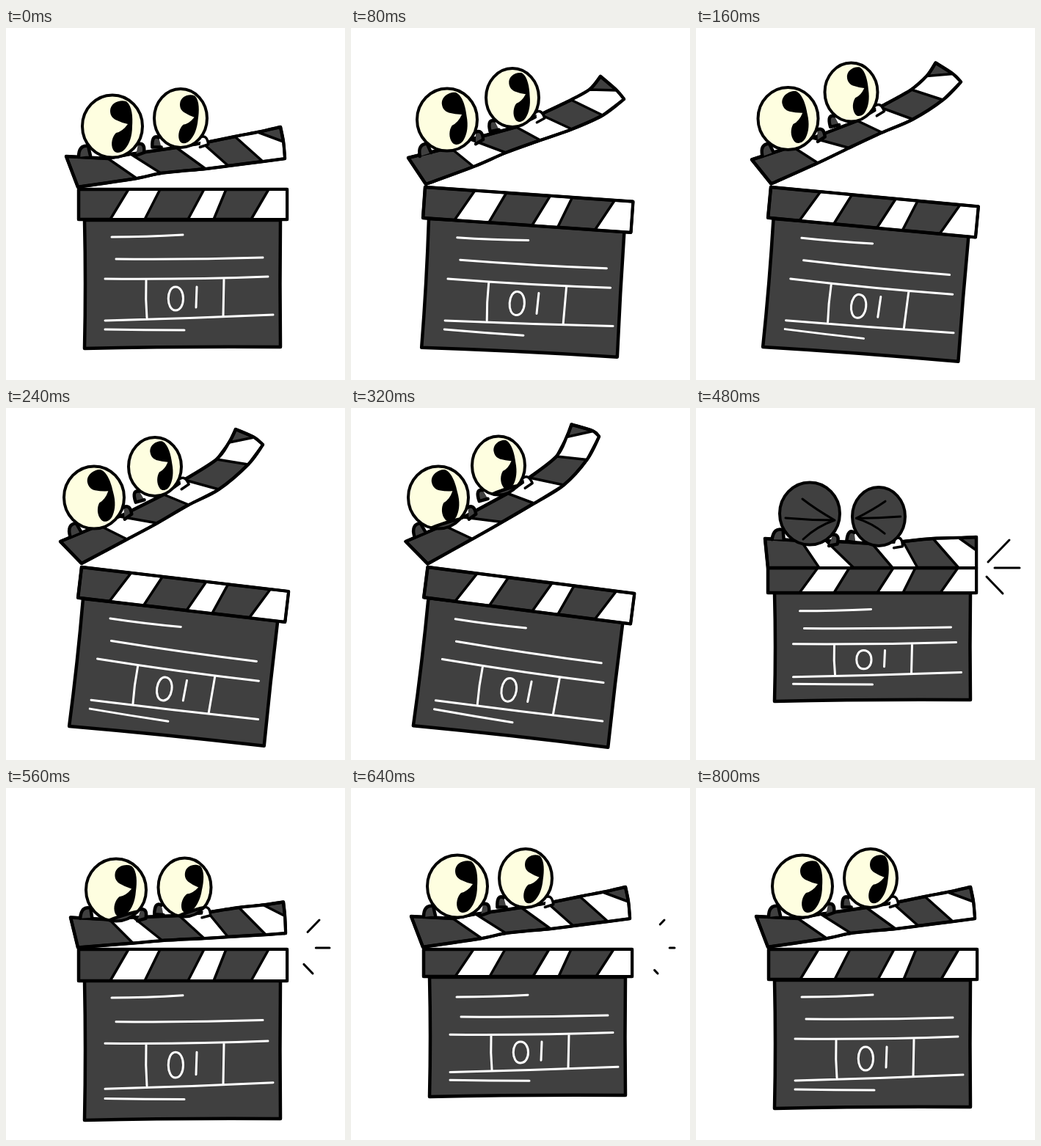
Recreate the animation shown at these times as an HTML page. Size 462 by 480 pixels, loop 1130 ms.

```html
<!DOCTYPE html>
<html lang="en">
<head>
<meta charset="utf-8">
<title>Clapperboard</title>
<style>
  html, body { margin: 0; width: 100%; height: 100%; overflow: hidden; background: #fff; }
  svg { display: block; width: 462px; height: 480px; }
  svg * { vector-effect: non-scaling-stroke; stroke-linecap: round; stroke-linejoin: round; }
  .dark { fill: #404040; stroke: #000; stroke-width: 4.5; }
  .white { fill: #fff; stroke: #000; stroke-width: 3.5; }
  .ink { fill: none; stroke: #fff; stroke-width: 3; }
  .line { fill: none; stroke: #000; stroke-width: 3; }
  .rim { fill: none; stroke: #000; stroke-width: 4; }
</style>
</head>
<body>
<svg id="stage" viewBox="0 0 462 480"></svg>
<script>
const FRAME = 80, LOOP = 1130;

// arm: left, hinge, lower edge, tip, then back along the upper edge
// eyes: x, y, x, y, tilt; strip and panel: x, y, angle, height
// ink: angle, pivot x, pivot y, dx, dy, vertical scale
const rest = {
  arm: [82,175, 98,217, 178,205, 211,198, 272,192, 303,188, 350,182, 380,178,
        378,155, 374,135, 343,142, 312,148, 268,157, 232,163, 170,172, 139,178],
  eyes: [145, 134, 238, 123, 0],
  strip: [99, 220, 0, 41],
  panel: [107, 262, 0, 174],
  ink: [0, 140, 284, 0, 0, 1],
  lid: 0, shut: 0, spark: 1
};
const lift = { ...rest,
  arm: [78,177, 102,213, 167,189, 211,170, 258,153, 301,138, 343,119, 372,97,
        362,85, 340,66, 325,84, 300,98, 258,118, 225,135, 163,152, 135,163],
  eyes: [131, 125, 220, 95, -11],
  strip: [101, 217, 4, 42],
  panel: [106, 260, 3.2, 175],
  ink: [3.9, 140, 297, 0, 0.5, 1]
};
const high = { ...rest,
  arm: [74,182, 103,212, 165,179, 206,157, 249,132, 290,111, 330,77, 350,50,
        338,40, 313,29, 304,47, 287,70, 243,98, 215,118, 155,148, 127,160],
  eyes: [120, 122, 203, 80, -16],
  strip: [103, 217, 6.7, 42],
  panel: [105, 260, 6.2, 174],
  ink: [8.6, 137, 272, 0, 1, 1]
};
const peak = { ...rest,
  arm: [75,182, 106,213, 166,178, 206,154, 250,128, 290,99, 313,64, 326,28,
        322,23, 288,16, 284,32, 273,62, 243,92, 212,115, 152,150, 125,160],
  eyes: [118, 122, 199, 77, -16],
  strip: [106, 217, 7.9, 41],
  panel: [106, 258, 7.3, 175],
  ink: [9.5, 128, 277, 0, 1, 1],
  lid: 1
};
const clap = { ...rest,
  arm: [94,178, 98,218, 168,218, 215,218, 268,218, 302,218, 358,218, 382,218,
        382,194, 382,176, 358,177, 323,178, 282,182, 240,185, 177,181, 143,181],
  eyes: [155, 144, 249, 148, 8],
  strip: [98, 218, 0, 34],
  panel: [107, 252, 0, 147],
  ink: [0, 140, 284, -2.5, -8, 0.79],
  shut: 1, spark: 0
};
const squash = { ...rest,
  strip: [99, 220, 0, 37],
  panel: [107, 258, 0, 162],
  ink: [0, 140, 284, 0, 0, 0.9],
  spark: 0.8
};

const lerp = (a, b, t) => a + (b - a) * t;
function mix(a, b, t) {
  if (typeof a === 'number') return lerp(a, b, t);
  if (Array.isArray(a)) return a.map((v, i) => mix(v, b[i], t));
  return Object.fromEntries(Object.keys(a).map(k => [k, mix(a[k], b[k], t)]));
}

const stretch = { ...mix(clap, rest, 0.5),
  strip: [99, 220, 0, 43], panel: [107, 262, 0, 190], ink: [0, 140, 284, 0, 1, 1.09],
  lid: 0.5, shut: 0, spark: 0.45
};
const settle = { ...rest, panel: [107, 262, 0, 178], ink: [0, 140, 284, 0, 0, 1.02] };

const poses = [rest, lift, mix(lift, high, 0.5), high, mix(high, peak, 0.5), peak,
               clap, stretch, squash, settle, rest];

const path = (cls, d) => `<path class="${cls}" d="${d}"/>`;
const poly = pts => 'M' + pts.map(p => p.join()).join('L') + 'Z';
const group = (transform, body) => `<g transform="${transform}">${body}</g>`;

// Smooth cubic segments through the points, continuing from the first one
function curve(pts) {
  let d = '';
  for (let i = 0; i < pts.length - 1; i++) {
    const a = pts[i], b = pts[i + 1], p = pts[i - 1] || a, n = pts[i + 2] || b;
    const c1 = [0, 1].map(k => a[k] + (b[k] - p[k]) / 6);
    const c2 = [0, 1].map(k => b[k] - (n[k] - a[k]) / 6);
    d += `C${c1} ${c2} ${b}`;
  }
  return d;
}

function drawPanel([x, y, angle, h]) {
  return group(`translate(${x} ${y}) rotate(${angle})`,
    path('dark', `M0,0H267Q266,${h / 2} 267,${h - 1}Q130,${h - 2} 0,${h + 1}Q2,${h / 2} 0,0Z`));
}

const inkLines = 'M144,285Q190,285 241,282M150,315Q250,316 350,313M135,342Q250,343 357,339' +
  'M135,399Q250,396 364,391M135,411Q190,412 243,412M191,344Q190,370 192,395M297,342L296,393' +
  'M231,353C218,353 218,385 231,385C245,385 245,353 231,353M260,353L259,381';

function drawInk([angle, px, py, dx, dy, sy]) {
  return group(`translate(${px + dx} ${py + dy}) rotate(${angle}) scale(1 ${sy}) translate(${-px} ${-py})`,
    path('ink', inkLines));
}

function drawStrip([x, y, angle, h]) {
  const stripe = (a, b, c, d) => path('white', poly([[a, 0], [b, 0], [c, h], [d, h]]));
  return group(`translate(${x} ${y}) rotate(${angle})`,
    path('dark', `M0,0H284V${h}H0Z`) +
    stripe(68, 111, 90, 43) + stripe(171, 201, 184, 149) + stripe(259, 284, 284, 235) +
    path('rim', `M0,0H284V${h}H0Z`));
}

function drawArm(flat) {
  const p = [];
  for (let i = 0; i < flat.length; i += 2) p.push([flat[i], flat[i + 1]]);
  const outline = `M${p[0]}L${p[1]}` + curve(p.slice(1, 8)) + curve(p.slice(7, 10)) +
    curve(p.slice(9, 13)) + `L${p[13]}L${p[14]}L${p[15]}Z`;
  const stripe = (...ids) => path('white', poly(ids.map(i => p[i])));
  return path('dark', outline) + stripe(15, 14, 3, 2) + stripe(13, 12, 5, 4) +
    stripe(11, 10, 8, 7, 6) + path('rim', outline);
}

const pupil = 'M-3,-21C-3,-32 10,-37 19,-34C27,-28 28,-12 27,0C27,14 23,24 18,30' +
  'C13,37 4,38 1,32C-3,24 0,14 5,9Q14,7 21,-3Q12,-5 4,-9C-1,-12 -3,-16 -3,-21Z';

function drawEye(x, y, tilt, lid, shut, second) {
  const rx = second ? 36 : 41, ry = second ? 40 : 42.5;
  const id = second ? 'clipB' : 'clipA';
  const size = `scale(${rx / 41} ${ry / 42.5})`;
  const ball = extra => `<ellipse rx="${rx}" ry="${ry}" ${extra}/>`;
  const folds = second
    ? path('dark', 'M-34,28Q-45,23 -44,42L-30,42') + path('white', 'M32,27Q41,24 43,38L30,42')
    : path('dark', 'M-46,42Q-46,25 -33,27L-30,40') + path('dark', 'M35,24Q45,22 43,36L32,40');
  const slide = (1 - lid) * 40;
  const lids = lid
    ? `<clipPath id="${id}">${ball('')}</clipPath><g clip-path="url(#${id})">` + group(size,
        path('dark', `M-60,${-90 - slide}V${-4 - slide}Q-15,-${30 + slide} 30,${-33 - slide}L60,${-40 - slide}V${-90 - slide}Z`) +
        path('dark', `M-60,${90 + slide}V${50 + slide}Q-5,${10 + slide} 60,${5 + slide}V${90 + slide}Z`)) + '</g>'
    : '';
  const crease = shut
    ? group(second ? 'scale(-.9 .8) translate(0 -6)' : '',
        path('line', 'M-10,-20Q8,-6 34,9Q0,9 -33,6M34,9Q10,17 -9,35'))
    : '';
  const look = shut ? '' : group(`rotate(${tilt + (second ? 5 : 0)}) ${size}`, `<path d="${pupil}"/>`);
  return group(`translate(${x} ${y})`,
    group(`rotate(${tilt}) ${size}`, folds) +
    ball(`fill="${shut ? '#404040' : '#fefee0'}"`) + look + lids + ball('class="rim"') + crease);
}

function drawSparks(k) {
  if (k >= 1) return '';
  const rays = [[398, 210, 427, 180], [407, 218, 441, 218], [396, 230, 418, 253]];
  return rays.map(([x, y, u, v]) =>
    path('line', `M${lerp(x, u, k)},${lerp(y, v, k)}L${u},${v}`)).join('');
}

const stage = document.getElementById('stage');
let shown = -1;

function render(time) {
  const step = Math.min(poses.length - 1, Math.floor((time % LOOP) / FRAME));
  if (step === shown) return;
  shown = step;
  const p = poses[step], [x1, y1, x2, y2, tilt] = p.eyes;
  stage.innerHTML = drawPanel(p.panel) + drawInk(p.ink) + drawStrip(p.strip) + drawArm(p.arm) +
    drawEye(x1, y1, tilt, p.lid, p.shut, false) + drawEye(x2, y2, tilt, p.lid, p.shut, true) +
    drawSparks(p.spark);
}

const start = performance.now();
function tick() {
  render(performance.now() - start);
  requestAnimationFrame(tick);
}
tick();
</script>
</body>
</html>
```
